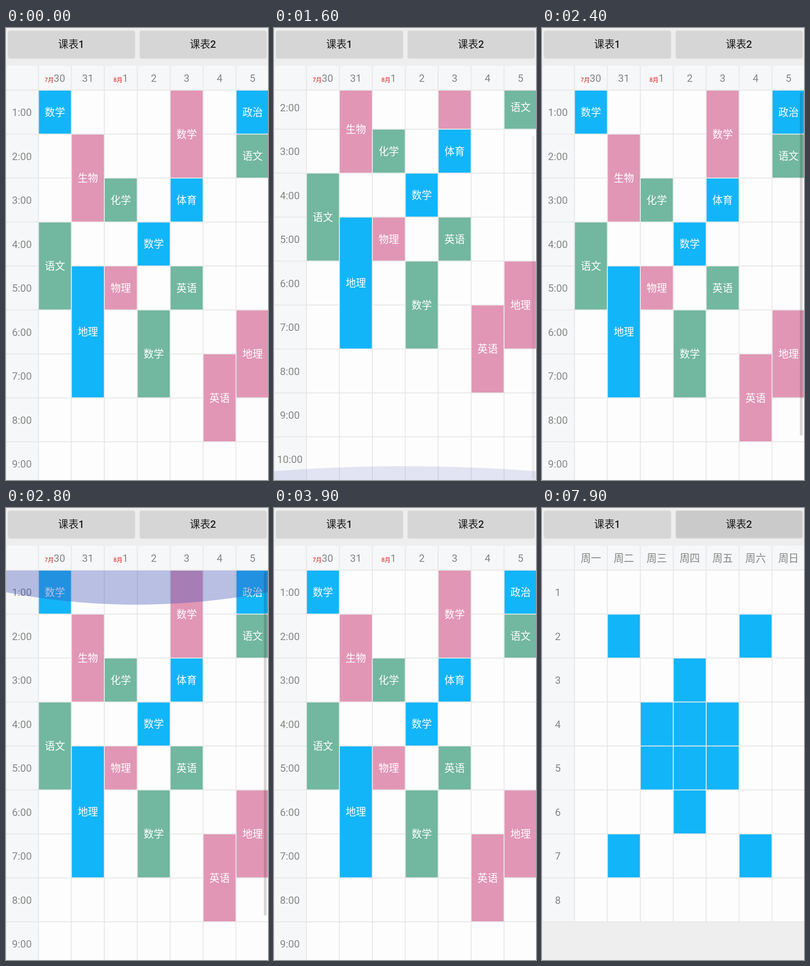
An HTML page that plays this animation: 570 px wide and 982 px high, repeating every 8000 ms.

```html
<!DOCTYPE html>
<html lang="zh-CN">
<head>
<meta charset="utf-8">
<style>
  html, body { margin: 0; width: 100%; height: 100%; overflow: hidden; background: #eee; }
  svg { display: block; width: 100%; height: 100%; }
  text { font: 22.2px Roboto, "Noto Sans CJK SC", "Noto Sans CJK", sans-serif; text-anchor: middle; fill: #858585; }
  .lesson { fill: #fff; }
  .month { font-size: 12.6px; fill: #e01010; }
  .label { font-weight: 500; fill: #1c1c1c; }
</style>
</head>
<body>
<svg id="stage" viewBox="0 0 570 982">
  <defs>
    <clipPath id="body"><rect y="134" width="570" height="848"/></clipPath>
    <filter id="shadow" x="-5%" y="-10%" width="110%" height="130%">
      <feDropShadow dx="0" dy="1" stdDeviation="1" flood-opacity=".22"/>
    </filter>
  </defs>
</svg>
<script>
const LEFT = 70.6, TOP = 135, COL = 71.65, ROW = 95.5, HEAD = 82, MAX_SCROLL = 106.2;
const BLUE = '#12b5f8', GREEN = '#72b7a0', PINK = '#e196b5';
const stage = document.getElementById('stage');

function add(parent, tag, attrs = {}, content = '') {
  const node = document.createElementNS('http://www.w3.org/2000/svg', tag);
  for (const key in attrs) node.setAttribute(key, attrs[key]);
  node.innerHTML = content;
  return parent.appendChild(node);
}
const rect = (parent, x, y, width, height, fill, more) =>
  add(parent, 'rect', { x, y, width, height, fill, ...more });
const text = (parent, x, cy, content, cls = '') =>
  add(parent, 'text', { x, y: cy + 8, class: cls }, content);
const colX = c => LEFT + COL * c;
const rowY = r => TOP + ROW * r;
const cell = (parent, c, r, span, fill, more) =>
  rect(parent, colX(c) + 1, rowY(r) + 1, COL - 2, ROW * span - 2, fill, more);

function lesson(parent, c, r, span, fill, name) {
  cell(parent, c, r, span, fill);
  if (name) text(parent, colX(c + .5), rowY(r + span / 2), name, 'lesson');
}

function grid(parent, top, height) {
  for (let c = 0; c < 7; c++) rect(parent, colX(c) - 1, top, 2, height, '#e7e7e7');
  rect(parent, 0, top, 1, height, '#e7e7e7');
}

function timetable(days, rows, rowLabel, lessons) {
  const page = add(stage, 'g');
  const clip = add(page, 'g', { 'clip-path': 'url(#body)' });
  const content = add(clip, 'g');
  rect(content, 0, TOP, 570, ROW * rows, '#fdfdfd');
  rect(content, 0, TOP, LEFT, ROW * rows, '#f6f7f8');
  grid(content, TOP, ROW * rows);
  for (let r = 0; r < rows; r++) {
    rect(content, 0, rowY(r + 1) - 1, 570, 2, '#e7e7e7');
    text(content, 34.5, rowY(r + .5) + .5, rowLabel(r + 1));
  }
  lessons.forEach(item => lesson(content, ...item));
  rect(page, 0, HEAD, 570, TOP - HEAD, '#f6f7f8');
  grid(page, HEAD, TOP - HEAD);
  rect(page, 0, TOP - 1, 570, 2, '#e7e7e7');
  days.forEach((day, c) => text(page, colX(c + .5), 109.3, day));
  return { page, clip, content };
}

function button(x, label) {
  const face = rect(stage, x, 6, 275, 58.5, '#d6d6d6', { rx: 3, filter: 'url(#shadow)' });
  text(stage, x + 137, 35.3, label, 'label');
  return face;
}

rect(stage, 0, 0, 570, 982, '#eee');
button(5, '课表1');
const second = button(291.5, '课表2');

const month = (m, d) => `<tspan class="month">${m}月</tspan>${d}`;
const dated = timetable(
  [month(7, 30), 31, month(8, 1), 2, 3, 4, 5], 10, r => r + ':00', [
    [0, 0, 1, BLUE, '数学'], [0, 3, 2, GREEN, '语文'],
    [1, 1, 2, PINK, '生物'], [1, 4, 3, BLUE, '地理'],
    [2, 2, 1, GREEN, '化学'], [2, 4, 1, PINK, '物理'],
    [3, 3, 1, BLUE, '数学'], [3, 5, 2, GREEN, '数学'],
    [4, 0, 2, PINK, '数学'], [4, 2, 1, BLUE, '体育'], [4, 4, 1, GREEN, '英语'],
    [5, 6, 2, PINK, '英语'],
    [6, 0, 1, BLUE, '政治'], [6, 1, 1, GREEN, '语文'], [6, 5, 2, PINK, '地理'],
  ]);
const weekly = timetable(
  [...'一二三四五六日'].map(d => '周' + d), 8, r => r,
  ['15', '3', '234', '234', '3', '15'].flatMap((cols, i) => [...cols].map(c => [+c, i + 1, 1, BLUE])));

const press = cell(dated.content, 0, 0, 1, '#000', { 'fill-opacity': .21 });
const glow = add(dated.clip, 'path', { fill: '#3f51b5' });
const bar = rect(dated.clip, 561, 140, 6, 745, '#000');

// Each step: start in ms, then the values that change.
const steps = [
  [0, { scroll: 0, bar: 0, edge: 'bottom', depth: 0, alpha: 0, pressed: -1, page: 1 }],
  [800, { scroll: 79.5, bar: 1 }],
  [900, { scroll: MAX_SCROLL }],
  [1100, { depth: 72, alpha: .32 }],
  [1300, { depth: 77, alpha: .36 }],
  [1500, { depth: 56, alpha: .28, bar: .8 }],
  [1600, { depth: 30, alpha: .14, bar: .4 }],
  [1700, { depth: 0, alpha: 0, bar: 0 }],
  [1900, { depth: 66, alpha: .3, bar: 1 }],
  [2100, { depth: 82, alpha: .36 }],
  [2200, { depth: 22, alpha: .08 }],
  [2400, { scroll: 0, edge: 'top', depth: 0, alpha: 0 }],
  [2600, { depth: 48, alpha: .25 }],
  [2700, { depth: 66, alpha: .34 }],
  [2800, { depth: 75, alpha: .36 }],
  [3000, { depth: 60, alpha: .3 }],
  [3100, { depth: 38, alpha: .19, bar: .7 }],
  [3200, { depth: 16, alpha: .07, bar: .3 }],
  [3300, { depth: 0, alpha: 0, bar: 0 }],
  [3800, { pressed: 0 }],
  [3900, { pressed: -1 }],
  [6900, { pressed: 2 }],
  [7000, { pressed: -1 }],
  [7900, { page: 2 }],
];

function glowPath(edge, depth) {
  const base = edge === 'top' ? TOP : 982, dir = edge === 'top' ? 1 : -1;
  const side = base + dir * depth * .64, peak = base + dir * depth * 1.36;
  return `M0 ${base}V${side}Q282 ${peak} 570 ${side}V${base}Z`;
}

function draw(time) {
  const s = Object.assign({}, ...steps.filter(([start]) => start <= time).map(step => step[1]));
  const show = (node, on) => node.setAttribute('visibility', on ? 'visible' : 'hidden');
  show(dated.page, s.page === 1);
  show(weekly.page, s.page === 2);
  second.setAttribute('fill', s.page === 2 ? '#cacaca' : '#d6d6d6');
  dated.content.setAttribute('transform', `translate(0 ${-s.scroll})`);
  bar.setAttribute('y', 140 + s.scroll * .893);
  bar.setAttribute('fill-opacity', .15 * s.bar);
  glow.setAttribute('d', glowPath(s.edge, s.depth));
  glow.setAttribute('fill-opacity', s.alpha);
  press.setAttribute('x', colX(Math.max(0, s.pressed)) + 1);
  press.setAttribute('fill-opacity', s.pressed < 0 ? 0 : .21);
}

const origin = performance.now();
function tick() {
  draw((performance.now() - origin) % 8000);
  requestAnimationFrame(tick);
}
tick();
</script>
</body>
</html>
```
